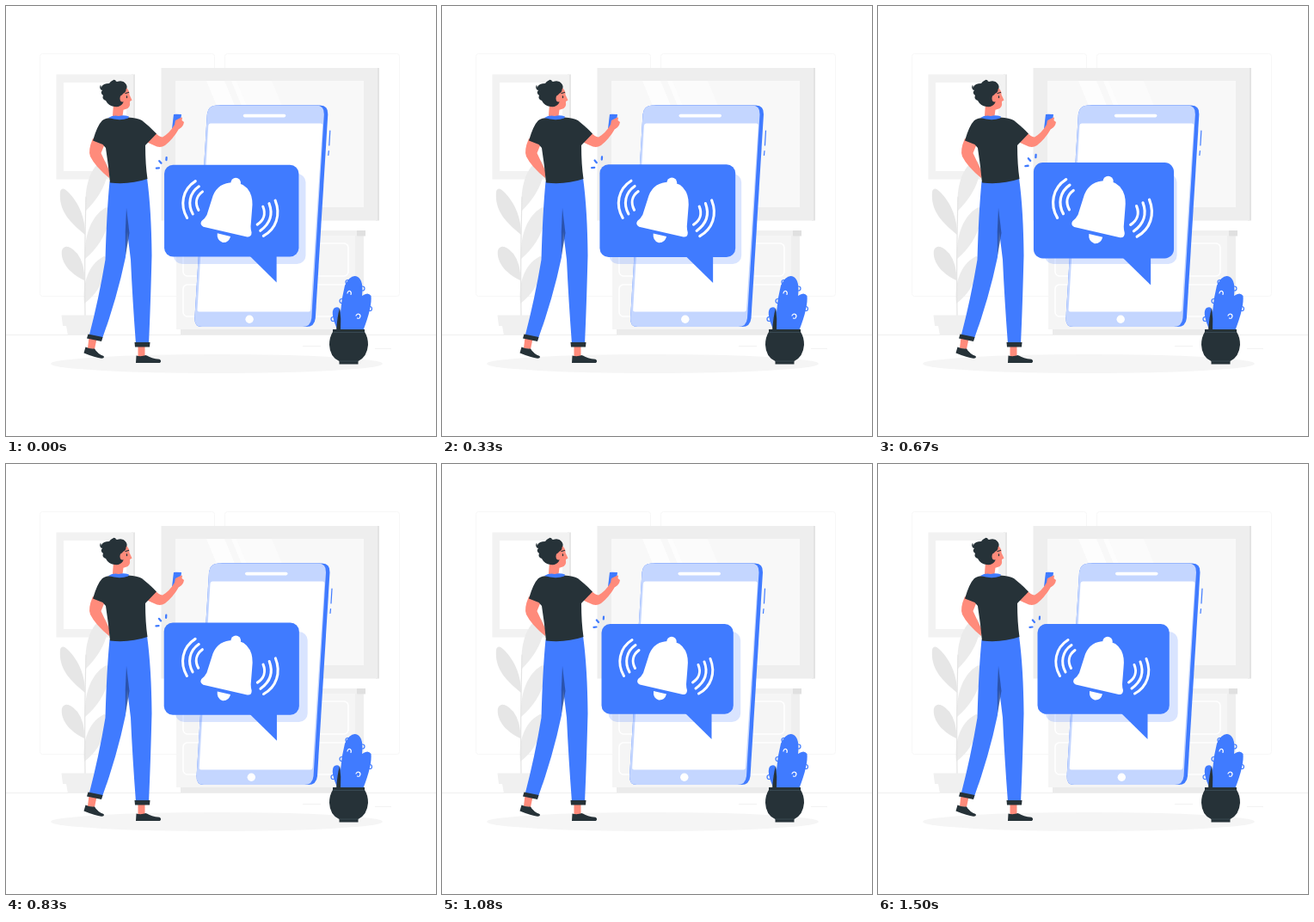
These frames come from a looping animation (500x500 px, 1540 ms). An HTML page:

```html
<!DOCTYPE html>
<html lang="en">
<head>
<meta charset="utf-8">
<title>Push notification</title>
<style>
  html, body { margin: 0; height: 100%; overflow: hidden; background: #fff; }
  svg { display: block; width: 100vw; height: 100vh; }
  .blue { fill: #407bff; }
  .dark { fill: #263238; }
  .skin { fill: #ff8b7b; }
  .line { fill: none; stroke-linecap: round; stroke-linejoin: round; }
</style>
</head>
<body>
<svg viewBox="0 0 500 500">
  <!-- room -->
  <g fill="none" stroke="#f7f7f7">
    <rect x="39.5" y="55.5" width="203" height="282" rx="3"/>
    <rect x="254.500" y="55.5" width="203" height="282" rx="3"/>
    <path d="M0 382.500H500" stroke="#efefef"/>
    <path d="M429 398.500H448M345 395.500H366" stroke="#f2f2f2"/>
  </g>

  <g>
    <path fill="#e6e6e6" d="M146 79.500H150V201.500H146z"/>
    <path fill="#f2f2f2" d="M58.500 79.500H148V201.500H58.500z"/>
    <path fill="#fff" d="M67 89H140V192H67z"/>
    <path fill="#e3e3e3" d="M430 72H434V249.500H430z"/>
    <path fill="#eee" d="M180.500 72H432V249.500H180.500z"/>
    <path fill="#f8f8f8" d="M197 87H416V234H197z"/>
    <path fill="#fff" opacity=".75" d="M233 87H254L315 234H294zM262 87H268L329 234H323z"/>
    <path fill="#fff" opacity=".4" d="M268 87H309L370 234H329z"/>
  </g>

  <g>
    <path fill="#ebebeb" d="M203 375H410V382H203z"/>
    <path fill="#f5f5f5" d="M198 267H408V376H198z"/>
    <path fill="#efefef" d="M406 267H416V376H406z"/>
    <path fill="#f0f0f0" d="M195 261H408V267H195z"/>
    <path fill="#e0e0e0" d="M408 261H418V267.500H408z"/>
    <g fill="none" stroke="#fff" stroke-width="1.500">
      <rect x="206" y="276" width="92" height="38" rx="5"/>
      <rect x="306" y="276" width="92" height="38" rx="5"/>
      <rect x="206" y="324" width="92" height="37" rx="5"/>
      <rect x="306" y="324" width="92" height="37" rx="5"/>
    </g>
  </g>

  <!-- leafy plant -->
  <g fill="#e6e6e6">
    <path d="M92 266C75 252 61 239 63 216Q65 208 74 218Q92 238 92 266z"/>
    <path d="M91 319C72 310 63 296 65 284Q70 274 83 288Q92 300 91 319z"/>
    <g fill="#ebebeb">
      <path d="M93 238C90 210 99 185 113 180Q120 180 118 196Q113 218 93 238z"/>
      <path d="M92 294C90 260 104 240 117 234Q122 236 119 252Q113 276 92 294z"/>
      <path d="M91 346C88 316 100 298 114 291Q120 292 117 306Q110 332 91 346z"/>
    </g>
    <path class="line" d="M93 222Q91 290 92 360" stroke="#e3e3e3" stroke-width="1.200"/>
    <path fill="#f0f0f0" d="M64.500 359.500H120L118 372H113L112 383H72L70 372H66z"/>
  </g>

  <ellipse cx="245" cy="416" rx="193" ry="11" fill="#f5f5f5"/>

  <g id="phone">
    <path id="case" class="blue" transform="translate(4.500)" d="M245 115.500H361Q370.500 115.500 370 126L355.500 363Q354.500 373 345 373H228Q219 373 219.600 363L234 126Q235 115.500 245 115.500z"/>
    <use href="#case" x="-4.500" style="fill:#bfd3ff"/>
    <path fill="#c4d6ff" d="M245 115.500H361Q370.500 115.500 370 126L355.500 363Q354.500 373 345 373H228Q219 373 219.600 363L234 126Q235 115.500 245 115.500z"/>
    <path fill="#fff" d="M238 136.500H366Q368.500 136.500 368.300 139L354.500 353Q354.300 355.500 352 355.500H225Q222.500 355.500 222.700 353L235.500 139Q235.700 136.500 238 136.500z"/>
    <rect x="276" y="125.800" width="49.500" height="3.600" rx="1.800" fill="#fff"/>
    <circle cx="283.300" cy="364.300" r="4.700" fill="#fff"/>
    <path class="line" stroke="#407bff" stroke-width="1.200" d="M377 145L376 162M375.500 168.500L375 173.500"/>
    <rect class="blue" x="195" y="195" width="153.700" height="105" rx="10" opacity=".2"/>
  </g>

  <!-- man -->
  <g>
    <path class="skin" d="M101 154Q95 168 98 175Q104 187 120 200L121 193Q117 185 110.500 171L115 160z"/>
    <path class="blue" d="M195 126Q196 125.300 204 126L202 142.500H193z"/>
    <path class="skin" d="M161 157L173 147Q178 152 182 152.500Q190 148 196 138L197 133L203 130L205 129.500L204.500 133L207 135Q206 141 201 143Q194 155 185 162Q179 166 172 162z"/>

    <path class="skin" d="M96.500 385L105.500 387L103 399L95 398zM153.500 394H161.500V408H153.500z"/>
    <path class="dark" d="M92.500 396.500Q97 399 103 398.500Q107 405 113.500 407Q115 409.500 111 409.800Q104 409 90.500 403.500zM151.500 406.500Q157 408 163 406Q169 410 178.500 410.800Q181.500 412.500 179 415H151z"/>
    <path class="line" stroke="#fff" stroke-width=".8" d="M105 400L108 398.500M164 406L166 404.500"/>
    <path class="blue" d="M120.500 204L164 200Q169 236 169.500 290Q168 350 166 393H151Q147 340 145 295L141 262L139 292Q129 340 111.500 388L96.500 384Q108 340 115.500 295Q117 240 120.500 204z"/>
    <path fill="#264a99" opacity=".8" d="M140 235Q138 262 139 290L143.500 264z"/>
    <path class="dark" d="M95.500 381.500L112.500 385L111 390L94 386.500zM149.500 391H167.500L167 396.500H150z"/>

    <path class="skin" d="M125 113L137 117L135.500 128Q130 133 124 128z"/>
    <path class="dark" d="M123 130Q132 132.500 142 129.500Q153 130 158 133Q167 140 175 148.500L162 162Q162 184 164.500 201Q144 208 121 205.500Q119 184 116 165L112.500 161L101 156.500Q106 139 112 133Q116 130 123 130z"/>
    <path class="blue" d="M119 130Q125 126.500 131 128Q137 126.500 143 128.500L142 130.500Q132 134 119 130z"/>
    <path class="skin" d="M127 96L140 95Q144 99 143.500 103L146.500 109.500L144 111Q145 119 139 120Q134 122 130 118z"/>
    <path class="dark" d="M126 117Q119 116 116 110Q111 108 113 104Q109 101 112 98Q108 96 111 94Q113 90 120 90Q124 84 129 88Q136 86 139 90Q142 94 139.500 97Q140 100 136 102L134 105Q138 108 136 113Q133 118 126 117z"/>
    <ellipse class="skin" cx="135.500" cy="107.500" rx="3" ry="4"/>
    <path class="line" stroke="#263238" stroke-width="1.300" d="M139 101.500L142.500 100.500M140.500 105V106.500M111 97Q109 95 110 93M124 88Q125 85.500 127 87"/>
  </g>

  <!-- cactus -->
  <g>
    <path class="blue" d="M386 378Q376 356 382 351Q388 348 389 356Q390 340 394 325Q401 311 409 315Q416 319 414 337Q421 332 424.500 337Q426 350 415 378z"/>
    <path class="dark" d="M384 378Q385 362 388 351Q390 364 389 378z"/>
    <g class="line" stroke-width="1.200" stroke="#407bff">
      <circle cx="397.500" cy="321" r="2.500"/>
      <circle cx="414.500" cy="328.500" r="2.500"/>
      <circle cx="390.500" cy="343" r="2.500"/>
      <circle cx="423" cy="352" r="2.500"/>
      <circle cx="380.500" cy="364" r="2.500"/>
      <path stroke="#fff" d="M397 334Q397.500 331 400 331.500Q402 333 401 335.500M407 360Q408.500 357.500 411 358.500Q413 360.500 411 363Q409.500 363.500 408.500 363"/>
    </g>
    <path class="dark" d="M380 376H417V379Q421 385 421 394Q420 408 409.500 413V416.500H387.500V413Q376.500 408 376 394Q376 385 380 379z"/>
    <path class="line" stroke="#455a64" stroke-width=".6" d="M381 379.500H416M388 413H409"/>
  </g>

  <g id="alert">
    <rect class="blue" x="185.500" y="186" width="153.300" height="104.700" rx="10"/>
    <path class="blue" d="M283 290H313.500V320z"/>
    <path class="line" stroke="#407bff" stroke-width="2.200" d="M188 177.500L187.800 180.500M179.800 181.500L182 184M176.500 189.800L179.500 189.500"/>
    <g fill="#fff">
      <circle cx="267" cy="206.500" r="5.700"/>
      <path d="M264 206Q277 206 283 217Q287 225 285.500 237L284 256Q284 260 285 263Q285 268.500 280 268L230 256.500Q225.500 254 228 250Q232 247 234 243L241 221Q247 206 264 206z"/>
      <path d="M246 264L261 267.500Q259 275 252 274.500Q245 272 246 264z"/>
    </g>
    <g class="line" stroke="#fff" stroke-width="3">
      <path d="M221 204.500C206 214 203 232 211.500 246.500M225 210.500C214 218 212 231 218 242M229 216.500C221.500 222 220.500 230 224.500 237.500"/>
      <path d="M312 226.500C318.500 243 313 259 298.500 267M305 230C309.500 242 306 253 295 261M298 233.500C301.500 242 298.500 249.500 291.500 254"/>
    </g>
  </g>
</svg>
<script>
const LOOP = 1540, CYCLE = 1500, STEP = LOOP / 37, START = 30;
const beat = [[0, 1], [10, 1.1], [30, 1], [40, 1], [50, 1.1], [60, 1], [100, 1]];
const shake = [[0, 0], [10, -1], [20, 2], [30, -4], [40, 4], [50, -4], [60, 4], [70, -4], [80, 2], [90, -1], [100, 0]];
const phone = document.getElementById('phone');
const alertBox = document.getElementById('alert');

function valueAt(keys, percent) {
  const i = Math.max(1, keys.findIndex(([p]) => p >= percent));
  const [p0, v0] = keys[i - 1], [p1, v1] = keys[i];
  return v0 + (v1 - v0) * (percent - p0) / (p1 - p0);
}

const origin = performance.now();
function draw(now) {
  const t = Math.max(0, now - origin) % LOOP;
  // The motion advances at 24 steps a second and rests at the end of the loop.
  const time = Math.floor((t + 2) / STEP) * STEP + START;
  const percent = Math.min(100, time / CYCLE * 100);
  phone.setAttribute('transform', `translate(${valueAt(shake, percent)})`);
  alertBox.setAttribute('transform', `translate(257 248) scale(${valueAt(beat, percent)}) translate(-257 -248)`);
  requestAnimationFrame(draw);
}
draw(origin);
</script>
</body>
</html>
```
